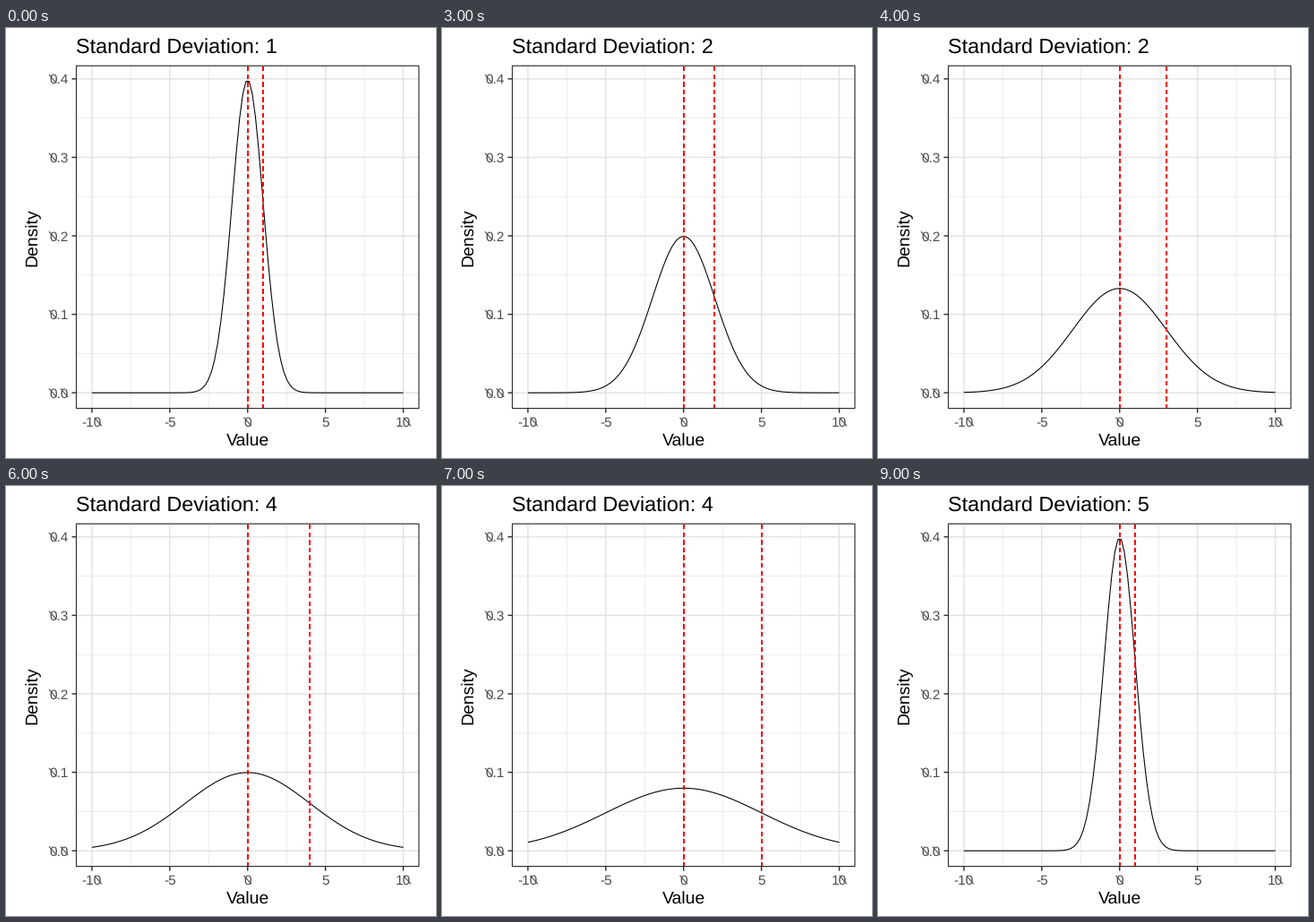
Animation, 480 px wide and 480 px high, one loop 10000 ms. Source, as a matplotlib script:

```python
import numpy as np
import matplotlib.pyplot as plt
from matplotlib.animation import FuncAnimation
from matplotlib.collections import LineCollection

plt.rcParams.update({
    "font.family": "Liberation Sans",
    "text.hinting": "none",
    "path.snap": False,
})

SIZE = 480
DPI = 72  # one point equals one pixel
LEFT, RIGHT, TOP, BOTTOM = 78.5, 460.9, 42.2, 424.6
X0, X_UNIT = 269.7, 17.38
Y0, Y_UNIT = 407.2, 876.0

INK, TICK_TEXT = "#333333", "#4d4d4d"
MAJOR, MINOR = "#e3e3e3", "#ebebeb"
TICK_SIZE, AXIS_SIZE, TITLE_SIZE = 15.4, 19.4, 23.4
EM = {"-": 0.333, ".": 0.278}

# One entry per second; the title lags behind the curve.
CURVE_SD = [1, 1, 2, 2, 3, 4, 4, 5, 5, 1]
TITLE_SD = [1, 1, 1, 2, 2, 3, 4, 4, 5, 5]


def px(x):
    return X0 + X_UNIT * x


def py(y):
    return Y0 - Y_UNIT * y


def density(x, sd):
    return np.exp(-0.5 * (x / sd) ** 2) / (sd * np.sqrt(2 * np.pi))


fig = plt.figure(figsize=(SIZE / DPI, SIZE / DPI), dpi=DPI, facecolor="white")
ax = fig.add_axes([0, 0, 1, 1])
ax.set(xlim=(0, SIZE), ylim=(SIZE, 0))
ax.axis("off")


def line(xs, ys, color, width, z=1):
    return ax.plot(xs, ys, color=color, lw=width, zorder=z,
                   solid_capstyle="butt")[0]


def tick_label(x, baseline, text, align):
    """Draw a tick label whose zeros carry a diagonal stroke."""
    ax.text(x, baseline, text, size=TICK_SIZE, color=TICK_TEXT,
            ha=align, va="baseline")
    widths = [EM.get(c, 0.556) * TICK_SIZE for c in text]
    pen = x - sum(widths) * (1 if align == "right" else 0.5)
    for char, w in zip(text, widths):
        if char == "0":
            cx, cy = pen + w / 2, baseline - 5.4
            line([cx - 4.2, cx + 4.2], [cy - 4.8, cy + 4.8], TICK_TEXT, 1.1)
        pen += w


def draw_grid():
    for x in (-7.5, -2.5, 2.5, 7.5):
        line([px(x)] * 2, [TOP, BOTTOM], MINOR, 0.9)
    for y in (0.05, 0.15, 0.25, 0.35):
        line([LEFT, RIGHT], [py(y)] * 2, MINOR, 0.9)
    for x in (-10, -5, 0, 5, 10):
        line([px(x)] * 2, [TOP, BOTTOM], MAJOR, 1.45, 2)
        line([px(x)] * 2, [BOTTOM, BOTTOM + 5], INK, 1.45, 2)
        tick_label(px(x), 445, str(x), "center")
    for y in (0, 0.1, 0.2, 0.3, 0.4):
        line([LEFT, RIGHT], [py(y)] * 2, MAJOR, 1.45, 2)
        line([LEFT - 5, LEFT], [py(y)] * 2, INK, 1.45, 2)
        tick_label(69.3, py(y) + 5.4, f"{y:.1f}", "right")


def draw_frame():
    ax.add_patch(plt.Rectangle((LEFT, TOP), RIGHT - LEFT, BOTTOM - TOP,
                               fill=False, ec=INK, lw=1.2, zorder=5))
    ax.text(X0, 466, "Value", size=AXIS_SIZE, ha="center", va="baseline")
    ax.text(34, 233.5, "Density", size=AXIS_SIZE, rotation=90, ha="center",
            va="baseline", rotation_mode="anchor")


def marker():
    """Dashed line drawn once per data row, so its soft edges fill in."""
    rows = LineCollection([], colors="red", linewidths=1.07,
                          linestyles=[(0, (4, 4))], capstyle="butt", zorder=4)
    ax.add_collection(rows, autolim=False)
    return rows


def place(rows, x):
    rows.set_segments([[(px(x), BOTTOM), (px(x), TOP)]] * 100)


draw_grid()
draw_frame()
xs = np.linspace(-10, 10, 100)
curve = line(px(xs), py(0 * xs), "black", 1.07, 3)
mean_line, sd_line = marker(), marker()
place(mean_line, 0)
title = ax.text(78, 28, "", size=TITLE_SIZE, ha="left", va="baseline")


def update(i):
    sd = CURVE_SD[i]
    curve.set_ydata(py(density(xs, sd)))
    place(sd_line, sd)
    title.set_text(f"Standard Deviation: {TITLE_SD[i]}")
    return curve, sd_line, title


anim = FuncAnimation(fig, update, frames=len(CURVE_SD), interval=1000,
                     repeat=True, repeat_delay=0)
plt.show()
```
